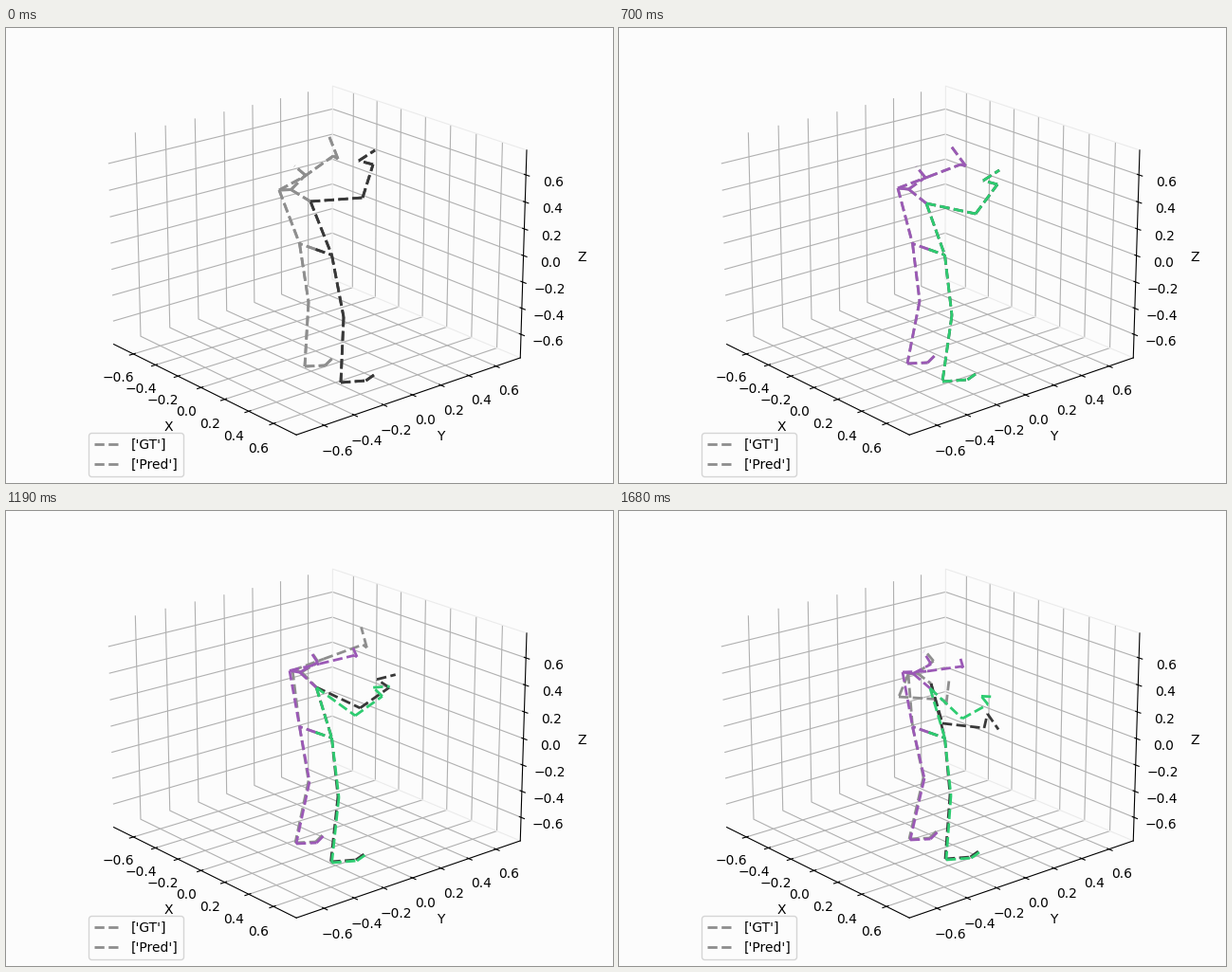
These frames come from a looping animation (640x480 px, 1750 ms). A matplotlib script:

```python
import numpy as np
import matplotlib.pyplot as plt
from matplotlib.animation import FuncAnimation
from matplotlib.lines import Line2D

W, H = 640, 480
FRAMES, STEP = 25, 70
FIRST_PRED = 10
PAPER = "#fcfcfc"
GT_COLORS = {"L": "#8e8e8e", "R": "#383838"}
PRED_COLORS = {"L": "#9b59b6", "R": "#2ecc71"}

# Each phase of the motion: its limits in time and the power of its easing.
UPPER_KEYS, UPPER_EASE = (0, 10, 15, 24), (2, 1, 2)
LEG_KEYS, LEG_EASE = (0, 10, 24), (2, 1)
PRED_KEYS, PRED_EASE = (10, 15, 24), (1, 1)

# Joints as stage points; head and hands as (turn in degrees, size).
UPPER = {
    "l_shoulder": [(288, 171), (294, 169), (302, 168), (305, 172)],
    "r_shoulder": [(321, 183), (324, 185), (327, 186), (329, 182)],
    "l_elbow": [(314, 157), (326, 157), (337, 154), (295, 196)],
    "r_elbow": [(376, 179), (376, 196), (375, 207), (341, 224)],
    "l_wrist": [(345, 135), (360, 144), (378, 138), (342, 199)],
    "r_wrist": [(387, 144), (399, 165), (405, 184), (385, 229)],
    "l_grip": [(0, 1), (-15, 1), (5, 0.9), (28, 1)],
    "r_grip": [(0, 1), (0, 1), (15, 1), (88, 1)],
    "nod": [(-10, 1), (0, 1), (6, 0.95), (0, 1)],
}
LEGS = {
    "l_knee": [(319, 289), (317, 288), (321, 281)],
    "r_knee": [(356, 305), (351, 303), (349, 299)],
    "l_ankle": [(315, 357), (304, 354), (306, 346)],
    "r_ankle": [(353, 374), (341, 373), (344, 367)],
}
# The prediction leaves the ground truth towards these.
PRED_UPPER = {
    "l_shoulder": [(299, 168), (299, 170)],
    "r_shoulder": [(327, 186), (328, 187)],
    "l_elbow": [(332, 159), (325, 169)],
    "r_elbow": [(370, 215), (362, 219)],
    "l_wrist": [(369, 149), (361, 164)],
    "r_wrist": [(399, 193), (389, 204)],
    "l_grip": [(-5, 0.6), (5, 0.4)],
    "r_grip": [(27, 0.9), (36, 0.72)],
    "nod": [(6, 1), (8, 1)],
}
LEG_DRIFT = np.array([1, 1])

# Rigid parts: offsets of the two outer joints from the joint that carries them.
HEAD = (17.5, -12.5), (8, -24)
HANDS = {"l": ((5, 3), (-4, -20)), "r": ((-15, -4), (2, -15))}
FEET = {"l": ((21.5, -1), (28.5, -8)), "r": ((26.5, -2), (35, -8))}
HIPS = {"root": (326.5, 233.5), "l_hip": (309.5, 227.5), "r_hip": (343.5, 239.5)}

CHAINS = [
    ("L", "root l_hip l_knee l_ankle l_ball l_toe"),
    ("R", "root r_hip r_knee r_ankle r_ball r_toe"),
    ("L", "l_shoulder l_hip"),
    ("R", "r_shoulder r_hip"),
    ("L", "neck head crown"),
    ("L", "neck l_shoulder l_elbow l_wrist l_hand l_tip"),
    ("L", "neck r_shoulder"),
    ("R", "r_shoulder r_elbow r_wrist r_hand r_tip"),
]
BONES = [(side, a, b) for side, chain in CHAINS
         for a, b in zip(chain.split(), chain.split()[1:])]


def travel(t, keys, eases, points):
    """Position at time t on a path of eased straight moves."""
    i = min(np.searchsorted(keys, t, "right"), len(keys) - 1) - 1
    u = ((t - keys[i]) / (keys[i + 1] - keys[i])) ** eases[i]
    a, b = np.array(points[i]), np.array(points[i + 1])
    return a + u * (b - a)


def ground_truth(t):
    state = {name: travel(t, UPPER_KEYS, UPPER_EASE, path)
             for name, path in UPPER.items()}
    for name, path in LEGS.items():
        state[name] = travel(t, LEG_KEYS, LEG_EASE, path)
    return state


def prediction(t):
    state = ground_truth(t)
    if t < FIRST_PRED:
        return state
    start = ground_truth(FIRST_PRED)
    for name, path in PRED_UPPER.items():
        state[name] = travel(t, PRED_KEYS, PRED_EASE, [start[name]] + path)
    drift = LEG_DRIFT * min(1, (t - FIRST_PRED) / 5)
    for name in LEGS:
        state[name] = state[name] + drift
    return state


def rigid(anchor, offsets, turn=0, size=1):
    c, s = np.cos(np.radians(turn)), np.sin(np.radians(turn))
    return [anchor + size * np.array([c * x - s * y, s * x + c * y])
            for x, y in offsets]


def pose(state):
    """All joints of the body, from the moving joints and turns."""
    joints = {**state, **HIPS}
    left, right = state["l_shoulder"], state["r_shoulder"]
    neck = left + 0.38 * (right - left) - (0, 5)
    joints["neck"] = neck
    joints["head"], joints["crown"] = rigid(neck, HEAD, *state["nod"])
    for s in "lr":
        joints[s + "_hand"], joints[s + "_tip"] = rigid(
            state[s + "_wrist"], HANDS[s], *state[s + "_grip"])
        joints[s + "_ball"], joints[s + "_toe"] = rigid(
            state[s + "_ankle"], FEET[s])
    return joints


fig = plt.figure(figsize=(W / 100, H / 100), dpi=100, facecolor=PAPER)


def setup_axes():
    ax = fig.add_axes([0, 0, 1, 1], projection="3d")
    ax.set_facecolor(PAPER)
    ax.view_init(elev=20, azim=-40)
    r = 0.75 * 25 / 24
    ticks = np.arange(-3, 4) * 0.2
    for axis in (ax.xaxis, ax.yaxis, ax.zaxis):
        axis.set_pane_color((1, 1, 1, 0))
    # faint outline of the rear wall, ending just short of the z axis
    end = 0.98 * r
    ax.plot([end, -r, -r, end], [r, r, r, r], [-r, -r, r, r],
            color="#ebebeb", lw=0.8, zorder=0.5)
    ax.set(xticks=ticks, yticks=ticks, zticks=ticks,
           xlabel="X", ylabel="Y", zlabel="Z")
    ax.set(xlim=(-r, r), ylim=(-r, r), zlim=(-r, r))
    handles = [Line2D([], [], color=GT_COLORS["L"], lw=2, ls="--", label=text)
               for text in ("['GT']", "['Pred']")]
    ax.legend(handles=handles, loc="lower left", facecolor=PAPER)


def make_skeleton():
    return [fig.add_artist(Line2D([], [], lw=2, ls="--")) for _ in BONES]


def draw(lines, joints, colors):
    for line, (side, a, b) in zip(lines, BONES):
        (x0, y0), (x1, y1) = joints[a], joints[b]
        line.set_data([x0 / W, x1 / W], [1 - y0 / H, 1 - y1 / H])
        line.set_color(colors[side])


setup_axes()
gt_lines = make_skeleton()
pred_lines = make_skeleton()


def update(i):
    draw(gt_lines, pose(ground_truth(i)), GT_COLORS)
    # the observed part shows both skeletons alike
    draw(pred_lines, pose(prediction(i)),
         PRED_COLORS if i >= FIRST_PRED else GT_COLORS)
    return gt_lines + pred_lines


anim = FuncAnimation(fig, update, frames=FRAMES, interval=STEP,
                     repeat=True, repeat_delay=0, blit=False)
plt.show()
```
